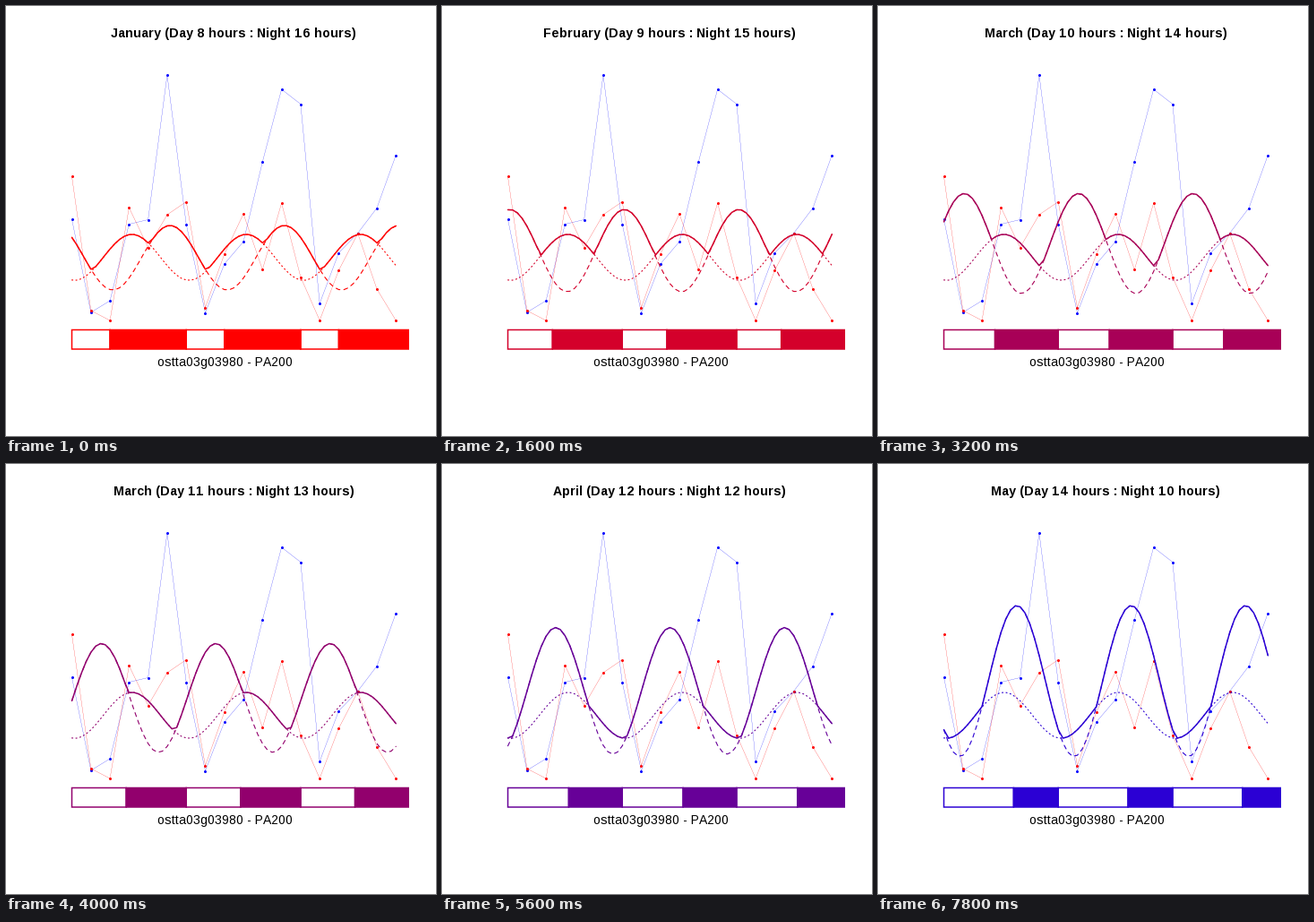
These frames come from a looping animation (480x480 px, 8 s). A matplotlib script:

```python
import numpy as np
import matplotlib as mpl
import matplotlib.pyplot as plt
from matplotlib.animation import FuncAnimation
from matplotlib.patches import Rectangle

mpl.rcParams.update({
    "font.family": "Liberation Sans",
    "text.hinting_factor": 1,
    "text.kerning_factor": 6,
})

SIZE, DPI = 480, 72           # at 72 dpi one point is one pixel
FRAMES, INTERVAL = 40, 200
STEPS = 47                    # steps from the shortest to the longest day
MONTHS = ["January", "February", "March", "April", "May"]

LEFT, CLIP_RIGHT = 73.51, 449.76
HOUR = 5.3203                 # pixels per hour
BAR_TOP, BAR_BOTTOM = 361.5, 383.0

BLUE_Y = [238, 342, 329, 243.5, 238.5, 77, 243.5, 342.5, 288,
          263, 174, 93, 109.5, 332, 275.5, 253.5, 225.5, 166.5]
RED_Y = [190.3, 340, 351, 225, 269.5, 233, 218.5, 336.5, 277,
         232, 294.3, 220, 302.5, 351, 295, 254, 316, 351]


def px(hour):
    return LEFT + HOUR * hour


def wave(hours, peak_hour, top, bottom):
    """Daily cosine between two pixel heights."""
    mid, amp = (top + bottom) / 2, (bottom - top) / 2
    return mid - amp * np.cos(2 * np.pi * (hours - peak_hour) / 24)


fig = plt.figure(figsize=(SIZE / DPI, SIZE / DPI), dpi=DPI, facecolor="white")
ax = fig.add_axes([0, 0, 1, 1])
ax.set_xlim(0, SIZE)
ax.set_ylim(SIZE, 0)
ax.axis("off")

# Measured series, one sample every four hours
sample_x = px(np.arange(18) * 4)
for ys, color in ((BLUE_Y, "blue"), (RED_Y, "red")):
    ax.plot(sample_x, ys, color=color, lw=0.225, zorder=2)
    ax.plot(sample_x, ys, "o", color=color, ms=3, mew=0, zorder=3)

# Model curves, one sample every hour
hours = np.arange(69)
curve_x = px(hours)
night_wave = wave(hours, 12.6, 254.9, 306.2)


def curve(lw, style="-"):
    line, = ax.plot(curve_x, night_wave, lw=lw, ls=style, zorder=4,
                    solid_capstyle="round", solid_joinstyle="round",
                    dash_capstyle="round", dash_joinstyle="round")
    return line


dotted = curve(1.125, (0, (1, 3)))
dashed = curve(1.125, (0, (4, 4)))
solid = curve(1.5)

# Day and night strip
strip_clip = Rectangle((0, 0), CLIP_RIGHT, SIZE, transform=ax.transData)


def strip_box():
    box = Rectangle((LEFT, BAR_TOP), 1, BAR_BOTTOM - BAR_TOP, lw=1.5,
                    fc="white", snap=False, zorder=5)
    ax.add_patch(box)
    box.set_clip_path(strip_clip)
    return box


days = [strip_box() for _ in range(3)]
nights = [strip_box() for _ in range(3)]

title = ax.text(254.4, 35, "", size=14.4, weight="bold",
                ha="center", va="baseline")
ax.text(244, 402, "ostta03g03980 - PA200", size=14.4,
        ha="center", va="baseline")


def draw(i):
    u = i / STEPS
    day = 8 + 8 * u
    color = (1 - u, 0, u)

    day_wave = wave(hours, 20.6 + 0.48 * i, 245 - 2.23 * i, 317 + 0.244 * i)
    dashed.set_ydata(day_wave)
    solid.set_ydata(np.minimum(day_wave, night_wave))
    for line in (dotted, dashed, solid):
        line.set_color(color)

    for n, (light, dark) in enumerate(zip(days, nights)):
        light.set_x(px(24 * n))
        light.set_width(HOUR * day)
        light.set_edgecolor(color)
        dark.set_x(px(24 * n + day))
        dark.set_width(HOUR * (24 - day))
        dark.set_facecolor(color)
        dark.set_edgecolor(color)

    whole = int(day)
    title.set_text(f"{MONTHS[i // 8]} (Day {whole} hours : "
                   f"Night {24 - whole} hours)")
    return [dotted, dashed, solid, title, *days, *nights]


anim = FuncAnimation(fig, draw, frames=FRAMES, interval=INTERVAL,
                     init_func=lambda: draw(0), repeat=True, repeat_delay=0)
plt.show()
```
